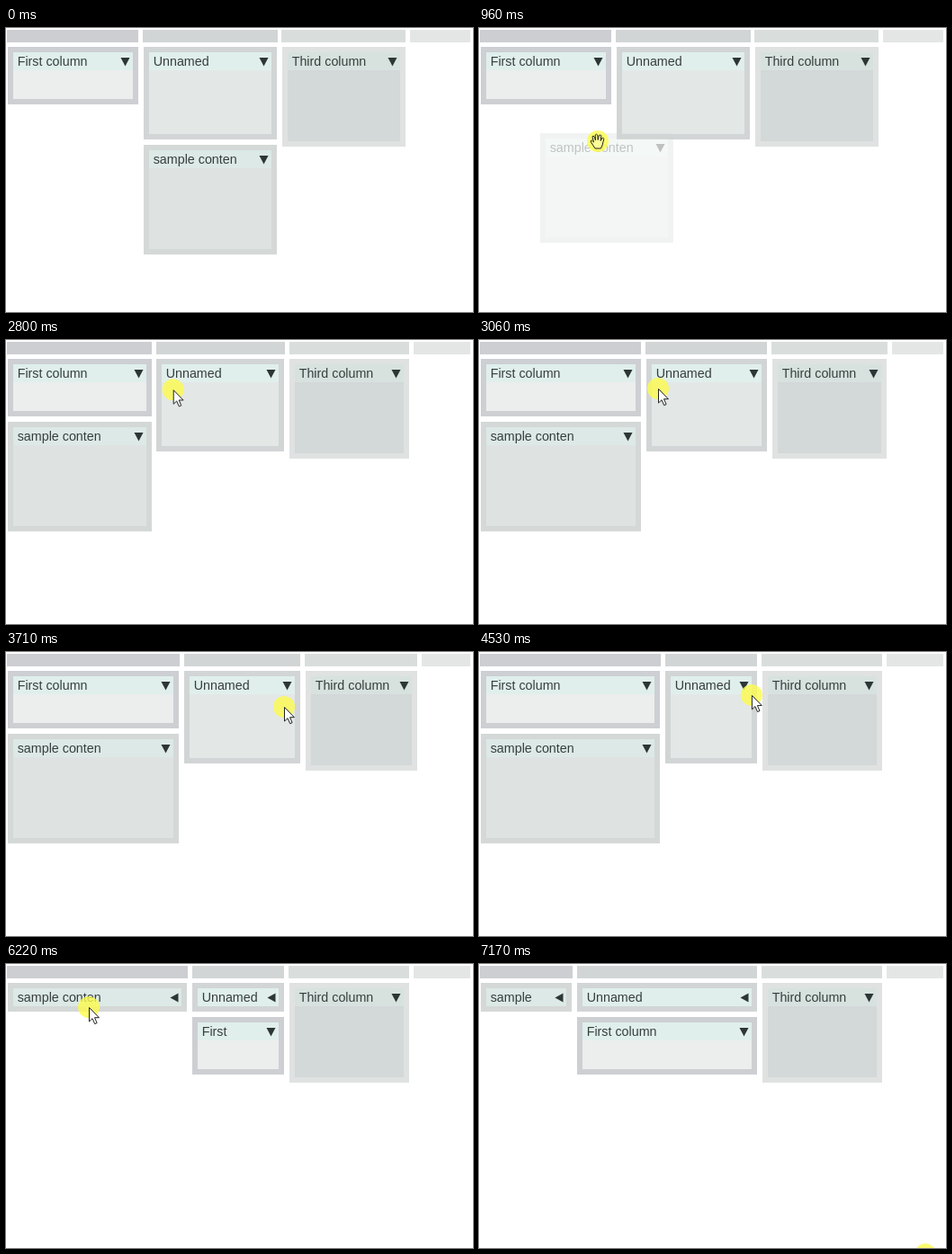
Recreate the animation shown at these times as an HTML page. Size 519 by 316 pixels, loop 7.24 s.

```html
<!DOCTYPE html>
<html lang="en">
<head>
<meta charset="utf-8">
<title>Column layout demo</title>
<style>
  html, body { margin: 0; width: 100%; height: 100%; overflow: hidden; background: #fff; }
  svg { display: block; width: 519px; height: 316px; }
  text { font: 14.3px "Liberation Sans", Arial, sans-serif; fill: #363e3c; }
</style>
</head>
<body>
<svg id="stage" viewBox="0 0 519 316"></svg>
<script>
const LOOP = 7240, TOP = 21, FOLDED = 32, GAP = 4.9;
const stage = document.getElementById('stage');

// moments at which panels are picked up, dropped or folded
const GRAB_SAMPLE = 800, DROP_SAMPLE = 1590;
const FOLD_PLAIN = 4690, FOLD_SAMPLE = 5050;
const GRAB_FIRST = 5480, DROP_FIRST = 5890;

const PANELS = {
  first: { name: 'First column', h: 64, fit: 118, edge: '#cdcfd3', head: '#e0efec', body: '#ebeeed' },
  plain: { name: 'Unnamed', h: 103, fit: 0, edge: '#d2d5d5', head: '#e0efec', body: '#e3e7e6', fold: FOLD_PLAIN },
  sample: { name: 'sample conten', h: 122, fit: 131, edge: '#d4d8d7', head: '#dce9e6', body: '#dee3e2', fold: FOLD_SAMPLE },
  third: { name: 'Third column', h: 111, fit: 118, edge: '#dfe2e1', head: '#d7e2df', body: '#d3d8d8' }
};
const BARS = ['#cdced2', '#d2d5d5', '#d9dedc', '#e3e6e5'];

// right edges of the first three columns, and how the dividers move them
const EDGES = [147.3, 301.5, 444.2];
const RESIZES = [
  { start: 2440, end: 3390, to: [192.9, 327.4, 457.2] },
  { start: 3980, end: 4480, to: [201.9, 309.4, 448.2] },
  { start: 6400, end: 6500, to: [103.9, 309.4, 448.2] }
];

const ENTRY = [407, 288];
const MOVES = [
  { start: 50, end: 760, to: [217, 139] },
  { start: 840, end: 960, to: [132, 126] },
  { start: 960, end: 1410, to: [72, 91] },
  { start: 1590, end: 1950, to: [156, 58] },
  { start: 2360, end: 3060, to: [199, 54] },
  { start: 3130, end: 3390, to: [309, 61] },
  { start: 3710, end: 3900, to: [329, 61] },
  { start: 3980, end: 4340, to: [311, 58] },
  { start: 4410, end: 4650, to: [295, 38] },
  { start: 4750, end: 5000, to: [187, 111] },
  { start: 5190, end: 5400, to: [89, 27], bare: true },
  { start: GRAB_FIRST, end: 5850, to: [341, 48] },
  { start: 5960, end: 6220, to: [92, 48] },
  { start: 6400, end: 7050, to: [486, 306] },
  { start: 7170, end: 7170, to: [496, 323] }
];

const within = (t, a, b) => t >= a && t < b;
const smooth = p => p * p * (3 - 2 * p);

function follow(steps, from, t) {
  for (const { start, end, to } of steps) {
    if (t < start) break;
    if (t < end) {
      const p = smooth((t - start) / (end - start));
      return from.map((v, i) => v + (to[i] - v) * p);
    }
    from = to;
  }
  return from;
}

const rect = (x, y, w, h, fill) =>
  `<rect x="${x}" y="${y}" width="${w}" height="${h}" fill="${fill}"/>`;

const height = (key, t) => t >= PANELS[key].fold ? FOLDED : PANELS[key].h;

function panel(key, x, y, w, t) {
  const p = PANELS[key], h = height(key, t);
  const right = x + w, mid = y + 16.5;
  // a narrow header wraps, leaving only the first word visible
  const label = w < p.fit ? p.name.split(' ')[0] : p.name;
  const arrow = h === FOLDED
    ? `M${right - 18.5} ${mid}l9 -5v10z`
    : `M${right - 19.5} ${mid - 4.5}h10l-5 9.5z`;
  return rect(x, y, w, h, p.edge) +
    rect(x + 6, y + 6, w - 12, h - 12, p.body) +
    rect(x + 6, y + 6, w - 12, 20, p.head) +
    `<text x="${x + 10.7}" y="${y + 21}">${label}</text>` +
    `<path d="${arrow}" fill="#2d3634"/>`;
}

function columns(t) {
  const one = [], two = ['plain'];
  if (t < GRAB_FIRST) one.push('first');
  if (t >= DROP_FIRST) two.push('first');
  if (t < GRAB_SAMPLE) two.push('sample');
  if (t >= DROP_SAMPLE) one.push('sample');
  return [one, two, ['third']];
}

const SHAPES = {
  resize: '<path d="M-8 0l5 -5v3.5h6v-3.5l5 5l-5 5v-3.5h-6v3.5z" fill="#000" stroke="#fff" stroke-width=".6"/>',
  hand: '<path d="M-3 8l-4.5 -7q-1 -2 .8 -2l2.2 2l-1.5 -6q.8 -2 2.2 0l1.3 4l-.3 -6q1.5 -1.6 2.5 0l.5 5.5l1.3 -5q1.6 -1.2 2.3 .3l-.6 5.7l1.6 -3q1.6 -.8 2 .8l-1.6 6.7l-1.7 4z" fill="#ffff98" stroke="#222" stroke-linejoin="round"/>',
  arrow: '<path d="M.5 .5v15.5l3.5 -3.3l2.7 6l2.4 -1.1l-2.6 -5.9h4.9z" fill="#fff" stroke="#222"/>'
};

function pointer(t, x, y, dragging, edges) {
  if (t < MOVES[0].start) return '';
  const onDivider = y < 100 && edges.some(r => Math.abs(x - r - GAP / 2) < 7);
  const look = dragging ? 'hand' : onDivider ? 'resize' : 'arrow';
  const move = MOVES.filter(m => m.start <= t).pop();
  const halo = look === 'resize' || move.bare
    ? '' : '<circle r="12" fill="#fcfb4c" opacity=".8"/>';
  return `<g transform="translate(${x} ${y})">${halo}${SHAPES[look]}</g>`;
}

function draw(t) {
  const edges = follow(RESIZES, EDGES, t);
  const [px, py] = follow(MOVES, ENTRY, t);
  const lefts = [1.4, ...edges.map(r => r + GAP)];
  const rights = [...edges, 516];
  let out = '';

  lefts.forEach((left, i) => {
    const x = Math.round(left);
    out += rect(x, 2, Math.round(rights[i]) - x, 14, BARS[i]);
  });

  columns(t).forEach((keys, i) => {
    const x = Math.ceil(lefts[i]), w = Math.floor(rights[i]) - x;
    let y = TOP;
    for (const key of keys) {
      out += panel(key, x, y, w, t);
      y += height(key, t) + 6;
    }
  });

  const ghost = (key, dx, dy, w) =>
    `<g opacity=".3">${panel(key, Math.round(px - dx), Math.round(py - dy), w, t)}</g>`;
  const dragSample = within(t, GRAB_SAMPLE, DROP_SAMPLE);
  const dragFirst = within(t, GRAB_FIRST, DROP_FIRST);
  if (dragSample) out += ghost('sample', 64, 9, 148);
  if (dragFirst) out += ghost('first', 87, 6, 199);

  stage.innerHTML = out + pointer(t, px, py, dragSample || dragFirst, edges);
}

function tick() {
  draw(performance.now() % LOOP);
  requestAnimationFrame(tick);
}
tick();
</script>
</body>
</html>
```
